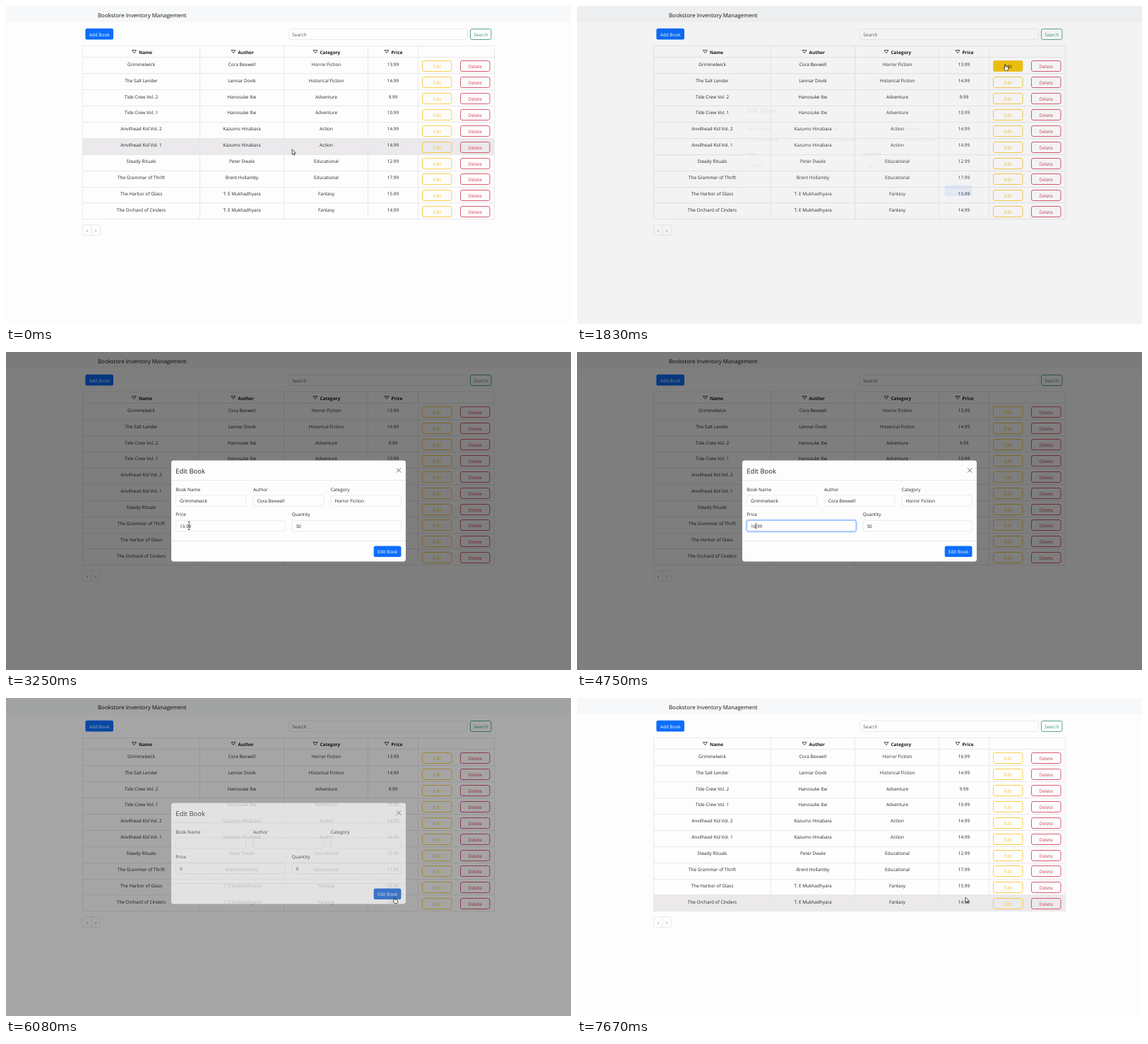
Write an HTML page with a canvas that moves like this. It is 800 px wide and 450 px high and loops after 9.08 s.

```html
<!DOCTYPE html>
<html lang="en">
<head>
<meta charset="utf-8">
<title>Bookstore Inventory Management</title>
<style>
html, body { margin: 0; width: 100%; height: 100%; overflow: hidden; background: #fefdfe; }
canvas { display: block; width: 800px; height: 450px; }
</style>
</head>
<body>
<canvas id="stage" width="800" height="450"></canvas>
<script>
const LOOP = 9080, STEP = 1000 / 12;
const PAGE = '#fefdfe', INK = '#212529', LINE = '#e7e8eb';
const BLUE = '#0d6efd', BLUE_HOVER = '#0b5ed7', YELLOW = '#f5c730', RED = '#cf4256', GREEN = '#3c966b';

// Timeline in ms
const OPEN = 1820, CLOSE = 6033, SLIDE = 330, FADE = 165, GONE = 6240;
const FOCUS = 3560, ERASE = 4580, RETYPE = 4745, MOVE_AGAIN = 5200, BLUR = 5990;

const BOOKS = [
  ['Grimmelwick', 'Cora Bexwell', 'Horror Fiction', '13.99'],
  ['The Salt Lender', 'Lennar Dovik', 'Historical Fiction', '14.99'],
  ['Tide Crew Vol. 2', 'Hanosuke Ibe', 'Adventure', '9.99'],
  ['Tide Crew Vol. 1', 'Hanosuke Ibe', 'Adventure', '10.99'],
  ['Anvilhead Kid Vol. 2', 'Kazumo Hinabara', 'Action', '14.99'],
  ['Anvilhead Kid Vol. 1', 'Kazumo Hinabara', 'Action', '14.99'],
  ['Steady Rituals', 'Peter Dwale', 'Educational', '12.99'],
  ['The Grammar of Thrift', 'Brent Hollamby', 'Educational', '17.99'],
  ['The Harbor of Glass', 'T. E Mukhadhyara', 'Fantasy', '15.99'],
  ['The Orchard of Cinders', 'T. E Mukhadhyara', 'Fantasy', '14.99']
];
const HEADS = [['Name', 181.5], ['Author', 322], ['Category', 438], ['Price', 539]];
const COLS = [108.5, 274.5, 393.5, 512.5, 583.5, 691.5];
const CENTERS = [191.5, 334, 453.5, 548];
const TOP = 73.2, ROW = 22.92;

// Dialog boxes at rest: x, y, width, height
const FIELDS = [
  ['Book Name', 240.5, 202.8, 99.5, 15.4],
  ['Author', 350.3, 202.8, 99.5, 15.4],
  ['Category', 460, 202.8, 99.5, 15.4],
  ['Price', 240.5, 238.4, 154.5, 15.4],
  ['Quantity', 405, 238.4, 154.5, 15.4]
];
const SAVE = [520.7, 274.5, 38.8, 15.6];
const EDIT = [589.5, 77.5, 41.5, 15];

const PATH = [
  [100, 405.2, 202.8], [1000, 606.3, 82.6], [2150, 606.3, 82.6],
  [3330, 254.5, 248], [MOVE_AGAIN, 254.5, 248], [5980, 550, 282]
];

const page = document.getElementById('stage').getContext('2d');
const layer = document.createElement('canvas');
layer.width = 800;
layer.height = 450;
const sheet = layer.getContext('2d');
page.textRendering = sheet.textRendering = 'geometricPrecision';
let ctx = page;

const clamp = v => Math.max(0, Math.min(1, v));
const ramp = (t, start, len) => clamp((t - start) / len);
const smooth = u => u * u * (3 - 2 * u);
const inside = (p, [x, y, w, h]) => p.x > x && p.x < x + w && p.y > y && p.y < y + h;

// cubic-bezier(0, 0, .58, 1)
function easeOut(x) {
  let lo = 0, hi = 1;
  for (let i = 0; i < 24; i++) {
    const s = (lo + hi) / 2;
    if (1.74 * s * s * (1 - s) + s * s * s < x) lo = s; else hi = s;
  }
  return smooth(lo);
}

function pointer(t) {
  let i = 0;
  while (i < PATH.length - 2 && t > PATH[i + 1][0]) i++;
  const [ta, xa, ya] = PATH[i], [tb, xb, yb] = PATH[i + 1];
  const u = smooth(ramp(t, ta, tb - ta));
  return { x: xa + (xb - xa) * u, y: ya + (yb - ya) * u };
}

function text(s, x, y, { size = 6.42, color = INK, align = 'left', bold = false } = {}) {
  ctx.font = `${bold ? 'bold ' : ''}${size}px "Open Sans", "Noto Sans", sans-serif`;
  ctx.textAlign = align;
  ctx.fillStyle = color;
  ctx.fillText(s, x, y);
}

function box([x, y, w, h], { fill, stroke, r = 2.6, width = 0.85 }) {
  ctx.beginPath();
  ctx.roundRect(x, y, w, h, r);
  if (fill) { ctx.fillStyle = fill; ctx.fill(); }
  if (stroke) { ctx.strokeStyle = stroke; ctx.lineWidth = width; ctx.stroke(); }
}

function button(label, rect, style, color) {
  const [x, y, w, h] = rect;
  box(rect, style);
  text(label, x + w / 2, y + h / 2 + 2.8, { color, align: 'center' });
}

function line(x1, y1, x2, y2, color = LINE, width = 1) {
  ctx.strokeStyle = color;
  ctx.lineWidth = width;
  ctx.beginPath();
  ctx.moveTo(x1, y1);
  ctx.lineTo(x2, y2);
  ctx.stroke();
}

function shape(points, fill, stroke, width) {
  ctx.beginPath();
  points.forEach(([x, y]) => ctx.lineTo(x, y));
  ctx.closePath();
  if (fill) { ctx.fillStyle = fill; ctx.fill(); }
  ctx.strokeStyle = stroke;
  ctx.lineWidth = width;
  ctx.stroke();
}

function toolbar() {
  ctx.fillStyle = PAGE;
  ctx.fillRect(0, 0, 800, 450);
  ctx.fillStyle = '#f7f8f9';
  ctx.fillRect(0, 0, 800, 23);
  text('Bookstore Inventory Management', 130, 15.6, { size: 7.9, color: '#101214' });
  button('Add Book', [112.4, 31.8, 39.6, 15.8], { fill: BLUE }, '#fff');
  box([400.5, 32.5, 253, 15], { stroke: LINE });
  text('Search', 405.3, 42.6, { color: '#555a60' });
  button('Search', [657.5, 32.5, 29.5, 15], { stroke: GREEN }, GREEN);
}

function table(t, hoverRow) {
  if (hoverRow >= 0) {
    ctx.fillStyle = '#ebe9eb';
    ctx.fillRect(108.5, Math.round(TOP + hoverRow * ROW), 583, 23);
  }
  line(108.5, 56.5, 691.5, 56.5);
  for (let i = 0; i <= 10; i++) {
    const y = Math.round(TOP + i * ROW) - 0.5;
    line(108.5, y, 691.5, y);
  }
  COLS.forEach(x => line(x, 56, x, 302));

  HEADS.forEach(([label, x]) => {
    shape([[x - 3, 62.6], [x + 3, 62.6], [x, 66.6]], null, INK, 0.8);
    text(label, x + 6.5, 67.5, { bold: true, color: '#15181b' });
  });

  const fill = ramp(t, 920, 150) * (1 - ramp(t, 1833, 150));
  BOOKS.forEach((book, i) => {
    const dy = i * ROW;
    book.forEach((cell, c) => {
      const value = i === 0 && c === 3 && t > 6150 ? '16.99' : cell;
      text(value, CENTERS[c], 84.7 + dy, { align: 'center' });
    });
    const hot = i === 0 ? fill : 0;
    const [x, y, w, h] = EDIT;
    const top = y + Math.round(dy);
    if (hot) box([x, top, w, h], { fill: `rgba(244,196,16,${hot})` });
    button('Edit', [x, top, w, h], { stroke: YELLOW }, hot > 0.5 ? '#222' : YELLOW);
    button('Delete', [x + 54, top, w, h], { stroke: RED }, RED);
  });

  box([108.5, 309.5, 25, 15], { stroke: LINE });
  line(121, 309.5, 121, 324.5);
  text('«', 115, 319.6, { size: 6, color: '#7d858d', align: 'center' });
  text('»', 127.2, 319.6, { size: 6, color: '#7d858d', align: 'center' });
}

function dialog(t, mouse) {
  const closing = t >= CLOSE;
  const shown = closing ? 1 - ramp(t, CLOSE, FADE) : ramp(t, OPEN, FADE);
  if (shown <= 0) return;
  const slide = closing ? easeOut(ramp(t, CLOSE, SLIDE)) : 1 - easeOut(ramp(t, OPEN, SLIDE));
  ctx.fillStyle = `rgba(0,0,0,${shown * 0.5})`;
  ctx.fillRect(0, 0, 800, 450);

  // The panel is painted on its own layer so that it fades as one
  ctx = sheet;
  ctx.clearRect(0, 0, 800, 450);
  panel(t, mouse);
  ctx = page;
  ctx.globalAlpha = shown;
  ctx.drawImage(layer, 0, Math.round(-22.1 * slide));
  ctx.globalAlpha = 1;
}

function panel(t, mouse) {
  box([234, 153.5, 332, 143], { fill: PAGE, r: 3.4 });
  text('Edit Book', 240.2, 171.5, { size: 9.45 });
  line(553, 164.4, 559.2, 170.6, '#55585c', 0.9);
  line(559.2, 164.4, 553, 170.6, '#55585c', 0.9);
  line(234, 181.5, 566, 181.5);
  line(234, 267.5, 566, 267.5);

  let price = '13.99';
  if (t >= ERASE) price = t < RETYPE ? '1.99' : '16.99';
  const values = t < CLOSE ? [...BOOKS[0].slice(0, 3), price, '30'] : ['', '', '', '0', '0'];
  const focus = ramp(t, FOCUS, 150) * (1 - ramp(t, BLUR, 80));

  FIELDS.forEach(([label, ...rect], i) => {
    const [x, y, w, h] = rect;
    text(label, x - 0.3, y - 6);
    box(rect, { fill: PAGE, stroke: LINE });
    if (i === 3 && focus) {
      box([x - 0.9, y - 0.9, w + 1.8, h + 1.8], { stroke: `rgba(13,110,253,${0.25 * focus})`, r: 3.4, width: 1.8 });
      box(rect, { stroke: `rgba(134,183,254,${focus})` });
    }
    text(values[i], x + 5.4, y + 10.5);
  });

  const caretOn = (t > FOCUS && t < 4160) || (t >= ERASE && t < 5240) || (t > 5770 && t < BLUR);
  if (caretOn) {
    const x = t >= ERASE && t < RETYPE ? 249.7 : 253.4;
    line(x, 241.8, x, 250.6, '#111', 0.7);
  }
  button('Edit Book', SAVE, { fill: inside(mouse, SAVE) ? BLUE_HOVER : BLUE }, '#fff');
}

function cursorKind(t, mouse) {
  if (t < OPEN) return inside(mouse, EDIT) ? 'hand' : 'arrow';
  if (t < 2150) return 'hand';
  if (t >= GONE) return 'arrow';
  if (t >= ERASE && t < MOVE_AGAIN) return 'none';
  if (inside(mouse, SAVE)) return 'hand';
  return FIELDS.some(([, ...rect]) => inside(mouse, rect)) ? 'beam' : 'arrow';
}

function cursor(kind, { x, y }) {
  ctx.save();
  ctx.translate(x, y);
  ctx.lineJoin = 'round';
  if (kind === 'arrow') {
    shape([[0, 0], [0, 7.4], [1.7, 5.9], [2.8, 8.4], [3.9, 7.9], [2.8, 5.5], [5, 5.3]], '#fff', '#111', 0.7);
  } else if (kind === 'hand') {
    shape([[-0.7, 0.2], [0.5, 0.2], [0.7, 3], [3.6, 3.6], [4.6, 4.3], [4.4, 6.5], [3.6, 8.6],
      [0, 8.6], [-1.9, 5.8], [-1.7, 4.9], [-0.7, 5.5]], '#fff', '#111', 0.7);
  } else if (kind === 'beam') {
    line(0, -5.5, 0, 5.5, '#222', 0.7);
    line(-1.6, -5.7, 1.6, -5.7, '#222', 0.7);
    line(-1.6, 5.7, 1.6, 5.7, '#222', 0.7);
  }
  ctx.restore();
}

function draw(t) {
  const mouse = pointer(t);
  const free = t < OPEN || t >= GONE;
  const row = Math.floor((mouse.y - TOP) / ROW);
  toolbar();
  table(t, free && row < 10 ? row : -1);
  dialog(t, mouse);
  cursor(cursorKind(t, mouse), mouse);
}

const start = performance.now();

function frame(now) {
  const t = Math.max(0, now - start) % LOOP;
  draw(Math.floor((t + 6) / STEP) * STEP);
  requestAnimationFrame(frame);
}
requestAnimationFrame(frame);
</script>
</body>
</html>
```
